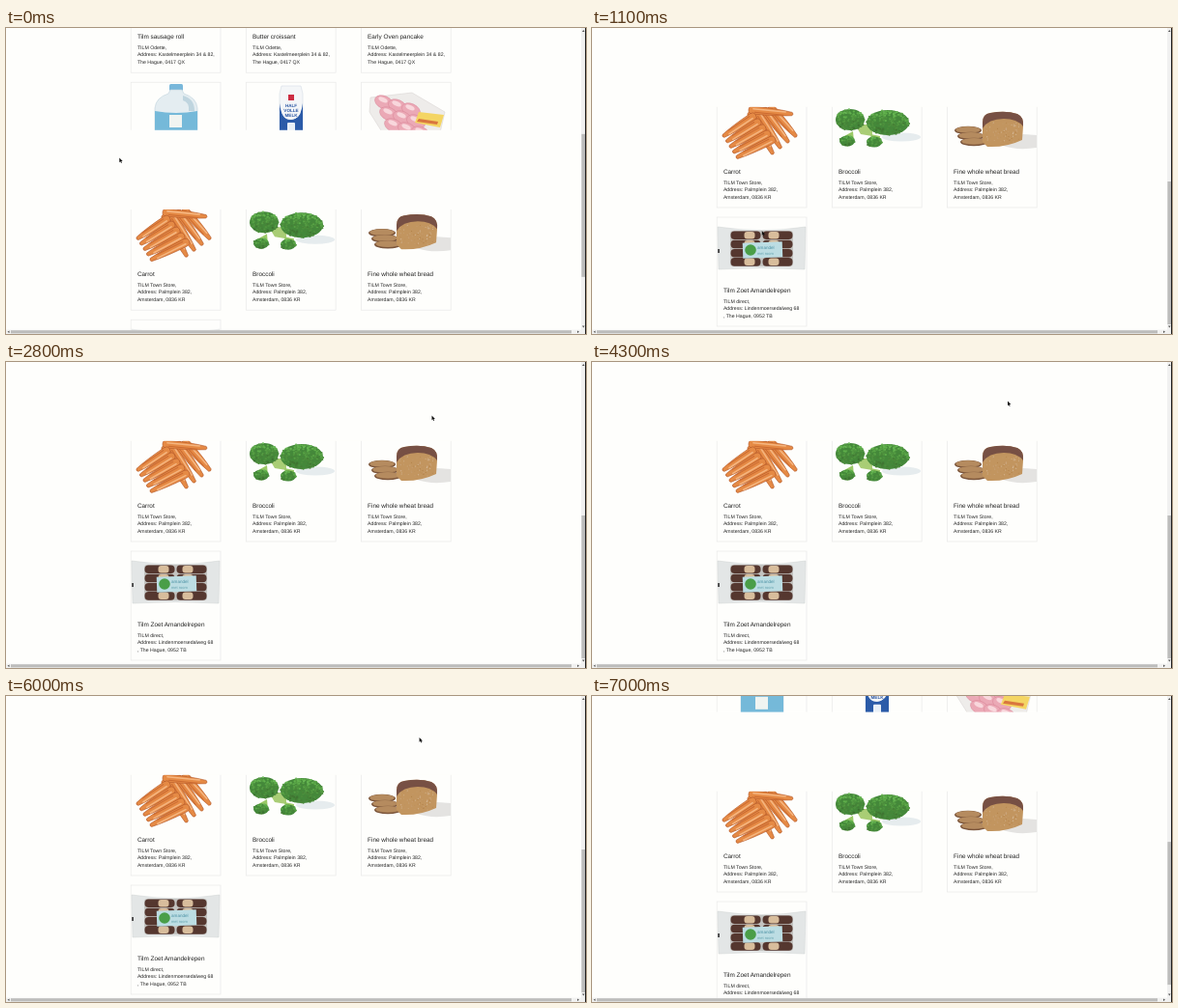
An HTML page that plays this animation: 600x317 px, repeating every 8000 ms.

```html
<!DOCTYPE html>
<html lang="en">
<head>
<meta charset="utf-8">
<title>Grocery list</title>
<style>
html, body { margin: 0; width: 100%; height: 100%; overflow: hidden; background: #fefefc; }
svg { display: block; width: 600px; height: 317px; }
text { font: 5.2px "Liberation Sans", Arial, sans-serif; fill: #262626; text-rendering: geometricPrecision; }
text.title { font-size: 6.42px; fill: #222; }
</style>
</head>
<body>
<svg id="stage" viewBox="0 0 600 317"></svg>
<script>
const PITCH = 123, ROW3 = 73, START = 106.2, BG = '#fefefc';

let seed = 7;
const rnd = () => (seed = seed * 16807 % 2147483647) / 2147483647;

const path = (d, fill, extra = '') => `<path d="${d}" fill="${fill}" ${extra}/>`;
const rect = (x, y, w, h, fill, extra = '') => `<rect x="${x}" y="${y}" width="${w}" height="${h}" fill="${fill}" ${extra}/>`;
const oval = (x, y, rx, ry, fill, extra = '') => `<ellipse cx="${x}" cy="${y}" rx="${rx}" ry="${ry}" fill="${fill}" ${extra}/>`;
const label = (x, y, s, extra = '') => `<text x="${x}" y="${y}" ${extra}>${s}</text>`;
const group = (body, extra) => `<g ${extra}>${body}</g>`;
const repeat = (n, part) => Array.from({ length: n }, (_, i) => part(i)).join('');

function card(col, row, title, lines) {
  const x = 129.2 + 119.1 * col, y = ROW3 + PITCH * (row - 3);
  return rect(x, y, 92.8, 113, BG, 'stroke="#e9e9e8" stroke-width=".7"')
    + label(x + 6.7, y + 77.5, title, 'class="title"')
    + lines.map((s, i) => label(x + 6.7, y + 88.5 + 7.75 * i, s)).join('');
}

// Tapered root from the thick end (x, y) to the tip (u, v)
function carrot(x, y, u, v) {
  const len = Math.hypot(u - x, v - y), angle = Math.atan2(v - y, u - x) * 180 / Math.PI;
  return group(
    path(`M0 -4Q-4 -4 -4 0T0 4Q${len * .6} 4 ${len} 1.8Q${len + 2} 0 ${len} -1.6Q${len * .6} -4 0 -4Z`,
      '#e58a45', 'stroke="#b4592a" stroke-width=".6"')
    + rect(0, -2.2, len * .85, 1.6, '#f5b57f', 'rx=".8"')
    + rect(2, 1.6, len * .75, 1, '#cb6a31', 'rx=".5"'),
    `transform="translate(${x} ${y}) rotate(${angle})"`);
}

const carrots = () =>
  repeat(4, i => carrot(165 + 7 * i, 90 - 2 * i, 187 + 8 * i, 130 - 6 * i))
  + carrot(166, 85, 207, 89)
  + repeat(5, i => carrot(166 + 5 * i, 92 + 6 * i, 136 + 3.5 * i, 112 + 5.5 * i));

function floret(x, y, rx, ry) {
  return oval(x, y, rx, ry, '#44883a') + repeat(rx * ry / 1.5, () => {
    const a = rnd() * 6.283, r = Math.sqrt(rnd()), light = 36 - 9 * Math.sin(a) * r + rnd() * 12;
    return oval(x + Math.cos(a) * r * rx, y + Math.sin(a) * r * ry, 1.2, 1, `hsl(108 40% ${light}%)`);
  });
}

const broccoli = () =>
  oval(320, 113, 20, 4.5, '#e6ecee')
  + path('M272 100L290 100 290 112 278 110Z', '#a9cd75')
  + path('M261 112L270 107 271 118 264 123ZM288 110L298 112 297 121 290 121Z', '#9bc967')
  + floret(267, 95, 15, 11) + floret(306, 98, 22, 13)
  + floret(264, 117, 8, 5.5) + floret(292, 118, 8, 5.5);

const bread = () =>
  path('M425 122L446 110 460 111V124Q440 127 425 122Z', '#e4e3e1')
  + repeat(3, i => oval(389 + 3 * i, 106 + 6 * i, 14, 4.3, '#7c563c') + oval(389 + 3 * i, 105.4 + 6 * i, 12.6, 3.4, '#b58b5f'))
  + path('M404 118V98Q404 89 412 88 428 85 440 89 447 92 446 102L445 116Q428 124 409 123Z', '#c2955f')
  + path('M404 104V98Q404 89 412 88 428 85 440 89 447 92 446 102 440 94 426 94 410 94 404 104Z', '#775044')
  + repeat(90, () => oval(407 + rnd() * 36, 98 + rnd() * 20, .6, .5, `hsl(32 42% ${48 + rnd() * 26}%)`));

const jug = () =>
  rect(169, 58, 14, 7, '#78b7da', 'rx="1.5"')
  + path('M170 64H182L184 68Q197 72 198 83V130H154V83Q155 72 168 68Z', '#e4edf1', 'stroke="#bfd2dc" stroke-width=".6"')
  + path('M183 70Q195 73 195 86H189Q190 77 183 75Z', '#bfd5df')
  + path('M154 86Q176 90 198 86V130H154Z', '#75b9d9')
  + rect(169, 90, 13, 13, '#f0f4f1');

const carton = () =>
  path('M285 60H305L307 68V130H283V68Z', '#f4f6f8', 'stroke="#cdd7e1" stroke-width=".5"')
  + path('M283 78Q285 96 295 95T307 78V130H283Z', '#2b5ba8')
  + oval(295, 85, 10, 10, '#f4f6f8')
  + rect(292, 69, 6, 6, '#cc2c42')
  + ['HALF', 'VOLLE', 'MELK'].map((s, i) =>
    label(295, 82.3 + 5 * i, s, 'text-anchor="middle" style="font-size:4.6px;font-weight:700;fill:#2a56a3"')).join('')
  + rect(291, 98, 8, 15, '#e9f0f7', 'rx="1"');

const meat = () =>
  path('M377 72L420 67 454 87 447 117 398 122 376 87Z', '#eeecea', 'stroke="#dad5d3" stroke-width=".6"')
  + repeat(9, i => {
    const x = 391 + 14 * (i % 3) + 5 * (i / 3 | 0), y = 77 + 4 * (i % 3) + 12 * (i / 3 | 0);
    return group(oval(0, 0, 10, 6.5, '#eba9b6', 'stroke="#d98598" stroke-width=".5"') + oval(-2, -2, 5, 2.3, '#f8d7dc'),
      `transform="translate(${x} ${y}) rotate(25)"`);
  })
  + path('M427 87L453 90 449 103 423 98Z', '#f4d563')
  + path('M427 94L447 97 446 100 425 97Z', '#d9763f');

const cookies = () =>
  path('M130 206Q176 213 221 206L220 250Q176 247 131 250Z', '#e3e6e6', 'stroke="#ced2d3" stroke-width=".5"')
  + rect(143, 210, 65, 37, '#c3c3c0', 'rx="3"')
  + repeat(8, i => {
    const x = 143.5 + 33 * (i % 2), y = 210.5 + 9.2 * (i >> 1);
    return rect(x, y, 31, 8.6, '#55372f', 'rx="4"') + rect(x + 14 - 8 * (i % 2), y + .4, 11, 7.6, '#d8bd9c', 'rx="3"');
  })
  + rect(156, 222, 41, 16, '#bcdde3', 'transform="rotate(-2 176 230)"')
  + label(171, 229, 'amandel', 'style="font-size:4.6px;fill:#4c91a4"')
  + label(171, 235, 'met room', 'style="font-size:4px;fill:#64a2af"')
  + oval(164, 230, 5.8, 5.8, '#4a9e48')
  + rect(130.3, 229, 1.5, 4, '#222');

const odette = ['TILM Odette,', 'Address: Kastelmeerplein 34 &amp; 82,', 'The Hague, 0417 QX'];
const town = ['TILM Town Store,', 'Address: Palmplein 382,', 'Amsterdam, 0836 KR'];
const direct = ['TILM direct,', 'Address: Lindenmoersedalweg 68', ', The Hague, 0952 TB'];
const row = (n, titles, lines) => titles.map((s, i) => card(i, n, s, lines)).join('');

const page = row(1, ['Tilm sausage roll', 'Butter croissant', 'Early Oven pancake'], odette)
  + row(2, ['', '', ''], [])
  + group(jug() + carton() + meat(), `transform="translate(0 ${-START})"`)
  + row(3, ['Carrot', 'Broccoli', 'Fine whole wheat bread'], town)
  + carrots() + broccoli() + bread()
  + row(4, ['Tilm Zoet Amandelrepen'], direct) + cookies()
  + rect(120, -.4, 350, 82.2, BG); // unpainted strip of the page

const bars = rect(595, 0, 5, 317, '#f1f1f0') + rect(0, 312.6, 600, 4.4, '#f1f1f0')
  + rect(5, 313.2, 580, 3.2, '#bdbdbc')
  + rect(595.4, 159, 3.6, 148, '#bdbdbc', 'id="thumb"')
  + path('M596 4l1.3-2 1.3 2zM596 308.5l1.3 2 1.3-2zM3.5 313.6l-2 1.2 2 1.2zM591 313.6l2 1.2-2 1.2z', '#555')
  + rect(599, 0, 1, 317, '#222');

const find = id => document.getElementById(id);
find('stage').innerHTML = group(page, 'id="page"') + bars
  + path('M0 0V4.7L1.1 3.7 1.8 5.4 2.6 5 1.9 3.4H3.4Z', '#111', 'id="pointer"');

// Pointer moves: start time, end time, x, y
const moves = [
  [700, 1300, 205, 248], [1500, 1800, 230.5, 259.5], [2200, 2800, 440.5, 55.5],
  [2800, 3600, 430, 40.5], [5000, 5500, 427.6, 43]
];

const progress = (t, from, to) => Math.min(1, Math.max(0, (t - from) / (to - from)));

function pointer(t) {
  let x = 117.3, y = 134.5;
  for (const [from, to, u, v] of moves) {
    const k = progress(t, from, to);
    x += (u - x) * k;
    y += (v - y) * k;
  }
  return [x, y];
}

const scroll = t => START * (1 - progress(t, 0, 500)) ** 1.5 + 17 * progress(t, 6300, 7000);

function draw() {
  const t = Math.floor(performance.now() % 8000 / 100) * 100; // ten steps a second
  const y = scroll(t);
  find('page').setAttribute('transform', `translate(0 ${y})`);
  find('thumb').setAttribute('y', 159 - y * .463);
  find('pointer').setAttribute('transform', `translate(${pointer(t)})`);
  find('pointer').setAttribute('visibility', t < 6400 ? 'visible' : 'hidden');
  requestAnimationFrame(draw);
}
draw();
</script>
</body>
</html>
```
